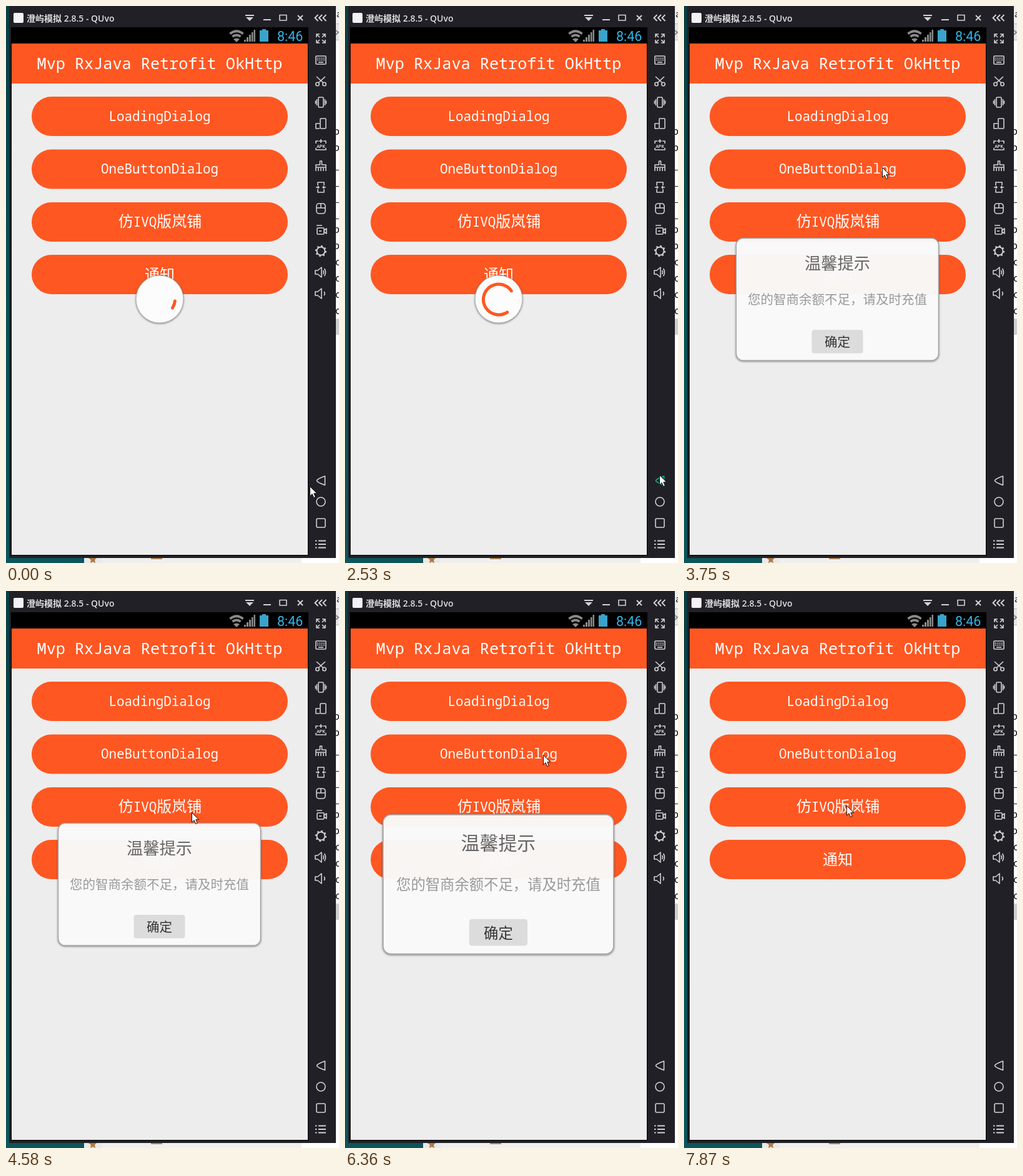
Write an HTML page that moves like this. It is 533 px wide and 891 px high and loops after 7.99 s.

```html
<!DOCTYPE html>
<html lang="zh">
<head>
<meta charset="utf-8">
<title>Dialog demo</title>
<style>
  html, body { margin: 0; width: 100%; height: 100%; overflow: hidden; background: #fff; }
  svg { display: block; width: 533px; height: 891px; }
  text { font-family: "Noto Sans CJK SC", "Noto Sans CJK", sans-serif; }
  .mid { text-anchor: middle; }
  .mono { font-family: "Noto Sans Mono", monospace; }
  .label { font-size: 24px; fill: #fff; }
  .label .mono, .label.mono { font-size: 20.9px; }
  .caption { font: 600 14px "Open Sans", "Noto Sans CJK SC", "Noto Sans CJK", sans-serif; fill: #dedee0; }
  .code { font: 16px "Noto Sans", sans-serif; fill: #111; }
  .icons { fill: none; stroke: #d2d2d4; stroke-width: 1.6; stroke-linejoin: round; }
  .fill { fill: #d2d2d4; stroke: none; }
  #dialog text { text-anchor: middle; }
</style>
</head>
<body>
<svg viewBox="0 0 533 891" xmlns="http://www.w3.org/2000/svg">
  <defs>
    <linearGradient id="teal" x2="0" y2="1">
      <stop offset="0" stop-color="#0a3d42"/>
      <stop offset=".45" stop-color="#0c5055"/>
      <stop offset="1" stop-color="#0c555b"/>
    </linearGradient>
    <filter id="shade" x="-20%" y="-20%" width="140%" height="140%">
      <feDropShadow dx="0" dy="1" stdDeviation="1.5" flood-color="#000" flood-opacity=".5"/>
    </filter>
  </defs>

  <!-- desktop behind the window -->
  <rect width="533" height="891" fill="#fff"/>
  <rect width="125" height="891" fill="url(#teal)"/>
  <rect x="125" y="880" width="28" height="11" fill="#e9e9e9"/>
  <rect x="153" y="880" width="320" height="11" fill="#f0efee"/>
  <path d="M132 883h13l-3 3 1 5-4-2-4 2 1-5z" fill="#b0793f"/>
  <path d="M232 884h18" stroke="#b58a58" stroke-width="2"/>
  <rect x="527" width="6" height="29" fill="#f0f0f0"/>
  <rect x="527" y="29" width="6" height="25" fill="#e6e6e6"/>
  <path d="M527 28.500h6M527 54.500h6" stroke="#bbb"/>
  <path d="M528 39l4 3-4 4" fill="none" stroke="#888" stroke-width="2"/>
  <rect x="527" y="500" width="6" height="26" fill="#cfcfcf"/>
  <path d="M527 262.500h6M527 288.500h6M527 314.500h6M527 340.500h6" stroke="#222"/>
  <g id="code" class="code"><text x="529" y="18" font-size="14">a</text></g>

  <!-- window -->
  <rect x="5" width="523" height="883" fill="#212026"/>
  <rect x="8" y="34" width="476" height="845" fill="#000"/>
  <rect x="9" y="60" width="474" height="64" fill="#ff5722"/>
  <rect x="9" y="124" width="474" height="754" fill="#ededed"/>
  <rect x="12" y="11" width="16" height="16" rx="2" fill="#f4f2f6"/>
  <text class="caption" x="33" y="25">澄屿模拟 2.8.5 - QUvo</text>

  <g class="icons">
    <path d="M383 15h14M412 22h12" stroke-width="2"/>
    <path class="fill" d="M384 18h12l-6 6z"/>
    <rect x="438" y="14.500" width="11" height="8.500"/>
    <path d="M467 15l8 8m0-8l-8 8" stroke-width="2"/>
    <path d="M499.500 14l-5 5 5 5m6.500-10l-5 5 5 5m6.500-10l-5 5 5 5" stroke-width="1.900"/>
  </g>

  <!-- status bar -->
  <g fill="none" stroke="#8a8a8a" stroke-width="4">
    <path d="M358.500 44.500q10.500-8.500 21 0M362.500 49q6.500-5 13 0" />
    <path d="M369 58l-5-5q5-3 10 0z" fill="#8a8a8a" stroke="none"/>
  </g>
  <path d="M381 57v-3h3v3zM385 57v-7h3v7zM389 57v-11h3v11zM393 57v-15h2.500v15zM396.500 57v-19h2.500v19z" fill="#8a8a8a"/>
  <path d="M406 39h4v-2h6v2h4v18h-14z" fill="#3ba3cb"/>
  <text x="434" y="56" style="font:21.500px Roboto,sans-serif" fill="#33b5e5">8:46</text>

  <text class="mono mid" x="246" y="101" font-size="25.200" fill="#fff">Mvp RxJava Retrofit OkHttp</text>
  <g fill="#ff5722">
    <rect x="41" y="145" width="410" height="63" rx="31.500"/>
    <rect x="41" y="229.500" width="410" height="63" rx="31.500"/>
    <rect x="41" y="314" width="410" height="63" rx="31.500"/>
    <rect x="41" y="398" width="410" height="63" rx="31.500"/>
  </g>
  <text class="label mono mid" x="246" y="184">LoadingDialog</text>
  <text class="label mono mid" x="246" y="268">OneButtonDialog</text>
  <text class="label mid" x="246.500" y="353">仿<tspan class="mono">IVQ</tspan>版岚铺</text>
  <text class="label mid" x="246" y="438">通知</text>

  <!-- side tools -->
  <g class="icons">
    <path transform="translate(504 52)" d="M-7-2v-5h5M-7-7l5 5M2-7h5v5M7-7l-5 5M-7 2v5h5M-7 7l5-5M2 7h5v-5M7 7l-5-5"/>
    <g transform="translate(504 86)">
      <rect x="-8" y="-6" width="16" height="13" rx="1"/>
      <path d="M-6-2.500h12M-6 .500h12" stroke-dasharray="2 1.300"/><path d="M-4 4h8"/>
    </g>
    <g transform="translate(504 120)">
      <path d="M-7-7l11 10M7-7l-11 10"/>
      <circle cx="-5.500" cy="5" r="2.700"/><circle cx="5.500" cy="5" r="2.700"/>
    </g>
    <g transform="translate(504 154)">
      <rect x="-4" y="-8" width="8" height="16" rx="1.500"/>
      <path d="M-6.500-5v10M6.500-5v10M-8.500-2.500v5M8.500-2.500v5"/>
    </g>
    <g transform="translate(504 188)">
      <rect x="-1" y="-8" width="9" height="16" rx="1"/><path d="M-2 0h-6v8h6"/>
    </g>
    <g transform="translate(504 222)">
      <path d="M-4-6h-4v4M4-6h4v4M-8 5v3h16v-3M0-9v6M-3-6h6"/>
      <text class="fill mid" y="5" style="font:bold 7px Roboto,sans-serif">APK</text>
    </g>
    <path transform="translate(504 256)" d="M-1.500-8h3v6h6.500v4h-16v-4h6.500zM-8 2v6M-4 3v5M0 3v5M4 3v5M8 2v6"/>
    <path transform="translate(504 290)" d="M-5-3v-5h10v5M-5 3v5h10v-5M-8 0h5M3 0h5M-5-2l2 2-2 2M5-2l-2 2 2 2"/>
    <g transform="translate(504 324)">
      <rect x="-7" y="-8" width="14" height="16" rx="4"/><path d="M-7-1h14M0-8v7"/>
    </g>
    <g transform="translate(504 358)">
      <rect x="-6" y="-3" width="11" height="10" rx="1"/>
      <path d="M5 1l4-3v8l-4-3M-7-7h9"/><path d="M-3 2h4"/>
    </g>
    <g transform="translate(504 392)">
      <circle r="6.500" stroke-width="2"/>
      <circle r="8.200" stroke-width="2" stroke-dasharray="2.600 3.840"/>
    </g>
    <g id="speakers">
      <path transform="translate(504 426)" d="M-9-3h4l6-5v16l-6-5h-4zM3.500-3q2 3 0 6M5.500-6q4 6 0 12"/>
      <path transform="translate(504 460)" d="M-9-3h4l6-5v16l-6-5h-4zM5-3q2.500 3 0 6"/>
    </g>
    <path id="back" d="M510.500 752v14.500q-13-5-13-7.300t13-7.200z"/>
    <circle cx="504" cy="793" r="7"/>
    <rect x="497" y="820" width="14" height="14" rx="2"/>
    <path d="M500 855.500h12M500 861h12M500 866.500h12M495 855.500h2.500M495 861h2.500M495 866.500h2.500" stroke-width="2"/>
  </g>

  <g id="loader">
    <circle cx="246" cy="469" r="38" fill="#fdfcfc" stroke="#aaa" stroke-width="1" filter="url(#shade)"/>
    <circle id="arc" cx="246" cy="469.500" r="24.500" pathLength="360" fill="none"
      stroke="#ff5722" stroke-width="5" stroke-linecap="round"/>
  </g>

  <g id="dialog">
    <rect x="83.500" y="371.500" width="324" height="195.500" rx="11" fill="#fcfcfc" fill-opacity=".95"
      stroke="#a5a5a5" stroke-width="1.500" filter="url(#shade)"/>
    <text x="245.500" y="421" font-size="26.300" fill="#666">温馨提示</text>
    <text x="245.500" y="477" font-size="20.500" fill="#999">您的智商余额不足，请及时充值</text>
    <rect x="204.500" y="518" width="82" height="37.500" rx="4" fill="#dcdcdc"/>
    <text x="245.500" y="545" font-size="20.500" fill="#333">确定</text>
  </g>

  <path id="cursor" d="M.500.500v15.500l3.600-3.400 2.600 5.900 2.600-1.100-2.500-5.700h4.900z" fill="#fff" stroke="#111" stroke-width="1"/>
</svg>
<script>
const LOOP = 7990;
const $ = id => document.getElementById(id);

// bursts of screen updates: first, last, count
const bursts = [[0, 0, 1], [150, 1060, 8], [1200, 2220, 8], [2380, 3160, 7], [3750, 3910, 2],
  [4310, 5270, 8], [5390, 5930, 5], [6360, 7020, 6], [7450, 7870, 4]];
const ticks = bursts.flatMap(([a, b, n]) =>
  Array.from({ length: n }, (_, i) => n > 1 ? a + (b - a) * i / (n - 1) : a));

// pointer stops: time, x, y
const stops = [[0, 486, 768], [280, 491, 776], [670, 503, 750], [2510, 503, 750], [3160, 317, 258],
  [4180, 317, 258], [4860, 256, 546], [5270, 256, 546], [5930, 317, 262], [6360, 317, 262],
  [7020, 257, 545], [7450, 257, 545], [7870, 260, 343], [LOOP, 260, 343]];

const wave = u => (1 - Math.cos(Math.PI * Math.min(1, Math.max(0, u)))) / 2;

function pointer(t) {
  const i = Math.max(1, stops.findIndex(s => s[0] > t));
  const [a, b] = [stops[i - 1], stops[i]];
  const k = wave((t - a[0]) / (b[0] - a[0]));
  return [a[1] + (b[1] - a[1]) * k, a[2] + (b[2] - a[2]) * k];
}

// the arc grows, rests, then its tail catches up, while the whole wheel turns
function spin(t) {
  const phase = 62 + t * .687, p = phase % 1320;
  const grown = 254 * wave(p / 460), cut = 254 * wave((p - 660) / 460);
  const start = 6 + t * .349 + Math.floor(phase / 1320) * 254 + cut;
  const length = 16 + grown - cut;
  $('arc').setAttribute('stroke-dasharray', `${length} ${360 - length}`);
  $('arc').setAttribute('transform', `rotate(${start % 360} 246 469.5)`);
}

const show = (id, on) => $(id).setAttribute('visibility', on ? 'visible' : 'hidden');

function draw(time) {
  const t = ticks.filter(s => s <= time).pop();
  show('loader', t < 2600);
  if (t < 2600) spin(t);

  show('dialog', (t > 3700 && t < 5100) || (t > 6300 && t < 7400));
  const scale = t > 6300 && t < 6400 ? 1.139 : 1;
  $('dialog').setAttribute('transform', `translate(246 469) scale(${scale}) translate(-246 -469)`);

  const [x, y] = pointer(t);
  $('cursor').setAttribute('transform', `translate(${Math.round(x)} ${Math.round(y)})`);
  $('back').setAttribute('stroke', x > 494 && y < 768 ? '#12b48c' : '#d2d2d4');
}

// letters peeking out beside the window
[['p', 206], ['p', 232], ['b', 363], ['b', 389], ['c', 415], ['c', 441], ['c', 467], ['c', 493]].forEach(([ch, y]) => {
  const el = document.createElementNS('http://www.w3.org/2000/svg', 'text');
  el.setAttribute('x', ch === 'c' ? 527 : 524);
  el.setAttribute('y', y);
  el.textContent = ch;
  $('code').append(el);
});

const begin = performance.now();
function loop() {
  draw((performance.now() - begin) % LOOP);
  requestAnimationFrame(loop);
}
loop();
</script>
</body>
</html>
```
